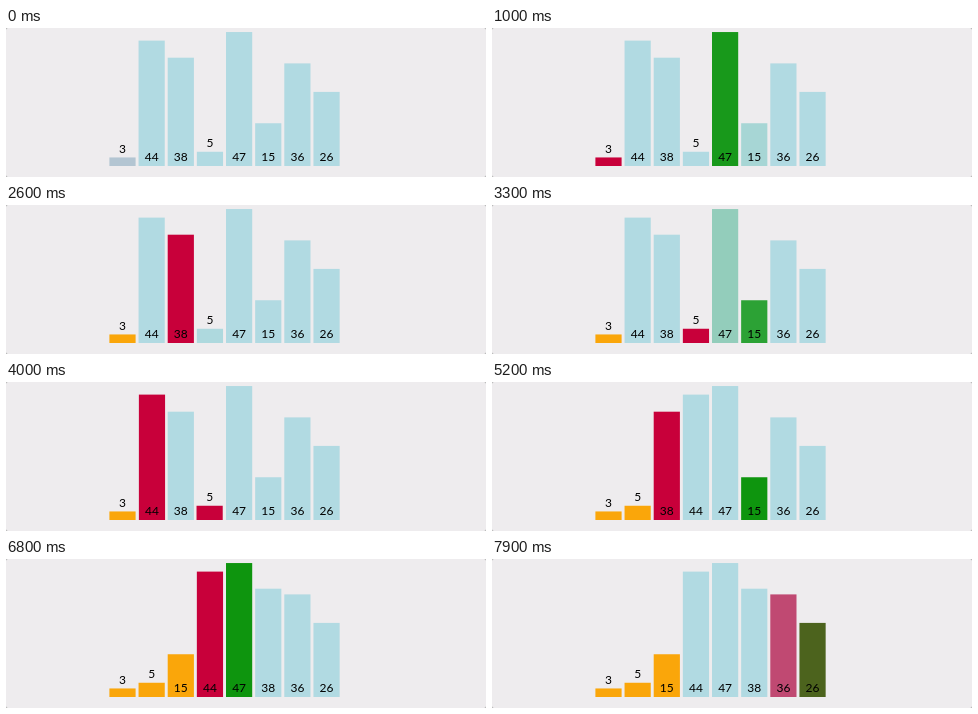
Recreate the animation shown at these times as an HTML page. Size 480x149 px, loop 8 s.

```html
<!DOCTYPE html>
<html lang="en">
<head>
<meta charset="utf-8">
<title>Selection sort</title>
<style>
  html, body { margin: 0; width: 100%; height: 100%; overflow: hidden; background: #a3a2a3; }
  svg { display: block; width: 480px; height: 149px; background: #eeecee; border-radius: 2px; }
  text { font: 12px Lato, "Open Sans", sans-serif; text-anchor: middle; fill: #000; }
</style>
</head>
<body>
<svg id="stage" viewBox="0 0 480 149"></svg>
<script>
const LOOP = 8000, TICK = 100;
const STEP = 201.8;   // ms per sorting step
const PHASE = 0.29;   // part of the first step already done at time 0
const LEFT = 103.4, PITCH = 29.15, WIDTH = 26.2, BASE = 138, UNIT = 2.85;
const BLUE = [177, 218, 226], RED = [200, 0, 58], GREEN = [14, 149, 14], ORANGE = [250, 166, 10];
const values = [3, 44, 38, 5, 47, 15, 36, 26];

// Every state records the slot and colour of each bar.
function sortStates(list) {
  const a = [...list], states = [];
  let done = 0;
  const push = (reds = [], green = -1) => {
    const state = {};
    a.forEach((v, i) => {
      const color = i === green ? GREEN : reds.includes(i) ? RED : i < done ? ORANGE : BLUE;
      state[v] = { slot: i, color };
    });
    states.push(state);
  };
  push();
  for (let i = 0; i < a.length; i++) {
    let min = i;
    push([min]);
    for (let j = i + 1; j < a.length; j++) {
      push([min], j);
      if (a[j] < a[min]) {
        min = j;
        push([min]);
      }
    }
    push([i, min]);
    if (min !== i) {
      [a[i], a[min]] = [a[min], a[i]];
      push([i, min]);
    }
    done = i + 1;
    push();
  }
  return states;
}

function add(parent, name, attrs) {
  const el = document.createElementNS("http://www.w3.org/2000/svg", name);
  for (const key in attrs) el.setAttribute(key, attrs[key]);
  return parent.appendChild(el);
}

const stage = document.getElementById("stage");
const bars = values.map(value => {
  const height = value * UNIT;
  const group = add(stage, "g", {});
  const rect = add(group, "rect", { y: BASE - height, width: WIDTH, height });
  const y = height < 20 ? BASE - height - 4.5 : BASE - 5.4;
  add(group, "text", { x: WIDTH / 2, y }).textContent = value;
  return { value, group, rect };
});

const states = sortStates(values);
const ease = p => p < 0.5 ? 4 * p ** 3 : 1 - 4 * (1 - p) ** 3;
const mix = (a, b, p) => a + (b - a) * p;

function draw(time) {
  const pos = PHASE + time / STEP;
  const k = Math.floor(pos), p = ease(pos - k);
  for (const { value, group, rect } of bars) {
    const from = states[k][value], to = states[k + 1][value];
    const x = LEFT + PITCH * mix(from.slot, to.slot, p);
    const rgb = from.color.map((c, i) => Math.round(mix(c, to.color[i], p)));
    group.setAttribute("transform", `translate(${x} 0)`);
    rect.setAttribute("fill", `rgb(${rgb})`);
  }
}

let start;
function frame(now) {
  start ??= now;
  // The picture advances in ticks; the small lead absorbs timer rounding.
  const time = Math.floor((now - start + 4) / TICK) * TICK;
  draw(time % LOOP);
  requestAnimationFrame(frame);
}
draw(0);
requestAnimationFrame(frame);
</script>
</body>
</html>
```
